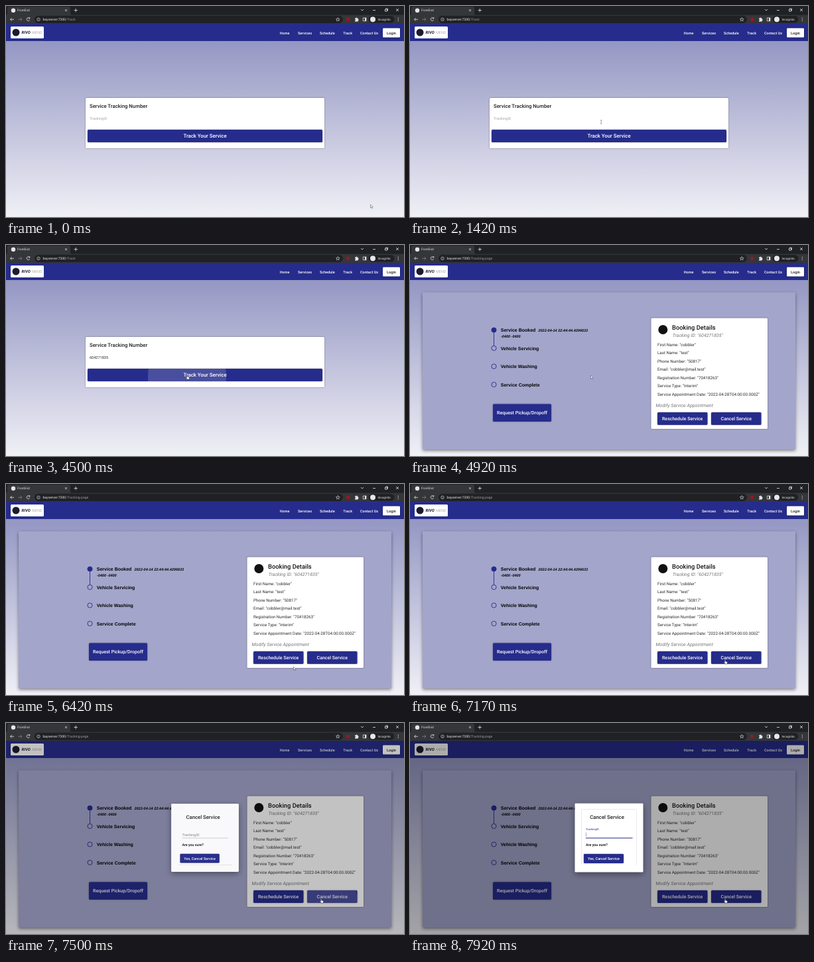
These frames come from a looping animation (600x319 px, 8000 ms). An HTML page:

```html
<!DOCTYPE html>
<html lang="en">
<head>
<meta charset="utf-8">
<title>Service tracking</title>
<style>
html, body { margin: 0; width: 100%; height: 100%; overflow: hidden; }
svg { display: block; width: 600px; height: 319px; font-family: Roboto, sans-serif; text-rendering: geometricPrecision; }
.m { font-weight: 500; }
.i { font-style: italic; }
.mid { text-anchor: middle; }
.w { fill: #fff; }
.grey { fill: #77777b; }
.blue { fill: #262c8c; }
.raised { filter: drop-shadow(0 .8px .8px #0006); }
.steps { font: bold 7px "Liberation Sans", Arial, sans-serif; }
.steps .date { font-size: 5.5px; font-style: italic; }
.line { fill: none; stroke: #e4e5e8; stroke-width: .8; }
#cursor path { stroke: #444; stroke-width: .5; fill: #fff; }
</style>
</head>
<body>
<svg viewBox="0 0 600 319">
  <defs>
    <linearGradient id="sky" x2="0" y2="1">
      <stop stop-color="#8b8ebe"/><stop offset="1" stop-color="#f0f0f6"/>
    </linearGradient>
    <clipPath id="trackClip"><rect x="123" y="187" width="354" height="19" rx="1.5"/></clipPath>
    <clipPath id="cancelClip"><rect x="454" y="253" width="75.5" height="19" rx="1.5"/></clipPath>
  </defs>

  <rect y="27" width="600" height="292" fill="url(#sky)"/>

  <!-- navigation bar -->
  <g>
    <rect y="27" width="600" height="26" class="blue"/>
    <rect x="7" y="31" width="50" height="18" rx="1.5" class="w"/>
    <circle cx="15" cy="40" r="5.5" fill="#1b1c30"/>
    <text x="23.5" y="42.2" font-size="6" class="i" font-weight="700" fill="#1b1c30">RIVO</text>
    <text x="39.3" y="42.2" font-size="5.5" class="i" font-weight="300" fill="#888">MEND</text>
    <g class="m w" font-size="5.5">
      <text x="412.7" y="42.5">Home</text><text x="440" y="42.5">Services</text>
      <text x="473" y="42.5">Schedule</text><text x="508.3" y="42.5">Track</text>
      <text x="534" y="42.5">Contact Us</text>
    </g>
    <rect x="568" y="33.5" width="26" height="14" rx="1.3" class="w raised"/>
    <text x="581" y="42.5" font-size="5.6" class="m mid" fill="#222">Login</text>
  </g>

  <g id="search">
    <rect x="120" y="139" width="360" height="76" rx="1.5" class="w raised"/>
    <text x="126" y="154.2" font-size="7.75" class="m" fill="#222">Service Tracking Number</text>
    <text id="field" x="126" y="171.5" font-size="5.55"></text>
    <rect id="caret" y="166.5" width=".4" height="6"/>
    <rect x="123" y="187" width="354" height="19" rx="1.5" class="blue raised"/>
    <g clip-path="url(#trackClip)"><circle id="trackRipple" cx="273" cy="198" class="w"/></g>
    <text x="300" y="199.1" font-size="7.8" class="m mid w">Track Your Service</text>
  </g>

  <g id="booking">
    <rect x="19" y="71.5" width="562" height="237.5" rx="1" fill="#a4a5cb" style="filter:drop-shadow(0 2px 2.5px #0007)"/>
    <g id="steps" class="steps">
      <path d="M126.5 128V152.5" stroke="#262c8c" stroke-width=".9"/>
      <text class="date" x="193.5" y="131">2022-04-14 22:44:44.4296633</text>
      <text class="date" x="137" y="139.5">-0400 -0400</text>
    </g>
    <rect x="125" y="240.5" width="88" height="26.5" rx="1.5" class="blue raised"/>
    <text x="169" y="256.3" font-size="7.05" class="m mid w">Request Pickup/Dropoff</text>

    <rect x="363.5" y="110.5" width="175.5" height="167.5" rx="1.5" class="w raised"/>
    <circle cx="381.3" cy="128" r="7" fill="#111"/>
    <text x="395" y="127.7" font-size="9.37" class="m" fill="#151515">Booking Details</text>
    <text x="395.8" y="139" font-size="7" class="i grey">Tracking ID: "604271835"</text>
    <g id="rows" font-size="6.23" fill="#2b2b2e"></g>
    <text x="370.5" y="245.3" font-size="7.08" class="i grey">Modify Service Appointment</text>
    <g class="blue raised">
      <rect x="373" y="253" width="75.5" height="19" rx="1.5"/>
      <rect x="454" y="253" width="75.5" height="19" rx="1.5"/>
    </g>
    <g clip-path="url(#cancelClip)"><circle id="cancelRipple" cx="475" cy="267" class="w"/></g>
    <g class="m mid w" font-size="7">
      <text x="410.7" y="265">Reschedule Service</text><text x="491.8" y="265">Cancel Service</text>
    </g>
  </g>

  <rect id="backdrop" y="27" width="600" height="292"/>

  <g id="dialog">
    <rect x="248.5" y="121.5" width="103" height="104" rx="1.3" class="w" style="filter:drop-shadow(0 3px 5px #0006)"/>
    <rect x="258.5" y="130.5" width="83" height="84.5" rx="1.2" class="w" style="filter:drop-shadow(0 .5px .7px #0005)"/>
    <text x="297" y="145" font-size="7.8" class="m mid" fill="#222">Cancel Service</text>
    <text id="label">TrackingID</text>
    <rect x="265" y="173.8" width="70.5" height=".4" fill="#888"/>
    <rect id="underline" y="173.5" height=".9" class="blue"/>
    <rect id="dialogCaret" x="265.2" y="165.5" width=".4" height="6.5" class="blue"/>
    <text x="265" y="186.4" font-size="5.4" class="m">Are you sure?</text>
    <rect x="262" y="198" width="60" height="14" rx="1.3" class="blue raised"/>
    <text x="292" y="207" font-size="5.5" class="m mid w">Yes, Cancel Service</text>
  </g>

  <!-- browser frame -->
  <g>
    <rect width="600" height="27" fill="#202124"/>
    <path d="M0 13.5q2 0 2-2V3q0-2 2-2H95q2 0 2 2v8.5q0 2 2 2H600V27H0Z" fill="#35363a"/>
    <circle cx="11" cy="6.7" r="3.2" fill="#e8e8ec"/>
    <text x="17" y="8.4" font-size="4.7" fill="#e4e5e8">FrontEnd</text>
    <path class="line" d="M89 5l3 3m0-3l-3 3M102.5 6.5h5.4m-2.7-2.7v5.4M535 5l2 2 2-2M553 6.5h4M571.5 5h3v3h-3zM572.5 5v-1h3v3h-1M588 4l4 4m0-4l-4 4"/>
    <rect x="43" y="14.7" width="465" height="11.2" rx="5.6" fill="#202124"/>
    <path class="line" d="M12 20.3H6.5m2.3-2.3l-2.3 2.3 2.3 2.3M35.5 18.5a2.4 2.4 0 1 0 .3 2.6M35.8 17v2h-2"/>
    <path class="line" style="stroke:#85868a" d="M18.5 20.3H24m-2.3-2.3l2.3 2.3-2.3 2.3"/>
    <g class="line" style="stroke-width:.6">
      <circle cx="49" cy="20.3" r="2.3"/>
      <path d="M49 20v1.5M49 18.8v.6M500.3 17.4l.8 2 2.1.1-1.7 1.3.6 2.1-1.8-1.2-1.8 1.2.6-2.1-1.7-1.3 2.1-.1z"/>
    </g>
    <text x="55.5" y="22.1" font-size="5.1" fill="#ececee">bayserver:7300<tspan id="path" fill="#9a9ca2"></tspan></text>
    <rect x="513.5" y="18" width="4.6" height="4.6" fill="#a3141c"/>
    <path fill="#e4e5e8" d="M526 18.5h1.4a1 1 0 0 1 2 0h1.3v1.6a1 1 0 0 1 0 2v1.3h-4.7v-1.4a1 1 0 0 0 0-2z"/>
    <path class="line" d="M538.3 18h4.6v4.7h-4.6z"/><path fill="#e4e5e8" d="M541 18h2v4.7h-2z"/>
    <rect x="546.5" y="15" width="39" height="10.6" rx="5.3" fill="#202124"/>
    <circle cx="553" cy="20.3" r="4" fill="#e8e8ec"/>
    <text x="560.5" y="22" font-size="4.6" fill="#ececee">Incognito</text>
    <path fill="#e4e5e8" d="M590.8 17.7h1v1h-1zm0 2.1h1v1h-1zm0 2.1h1v1h-1z"/>
  </g>

  <g id="cursor">
    <path id="arrow" d="M0 0V5.2L1.2 4.1 2 6 2.9 5.6 2.1 3.8H3.7Z"/>
    <path id="ibeam" style="fill:none" d="M-1.2-2.8Q0-2.8 0-2.2 0-2.8 1.2-2.8M0-2.2V2.2M-1.2 2.8Q0 2.8 0 2.2 0 2.8 1.2 2.8"/>
    <path id="hand" d="M0 .4Q.6-.4 1.1.4V2.3L3.6 2.9Q4 3 3.9 3.8L3.4 6H.8L-1 3.8Q-1 3-.3 3.2L0 3.5Z"/>
  </g>
</svg>
<script>
const LOOP = 8000;
const CODE = '604271835';
const FOCUS = 3420, PASTE = 3800, TRACK = 4480, PAGE = 4670;
const CANCEL = 7340, OPEN = 7390, OPENED = 7540;
// time, x, y
const ROUTE = [
  [500, 549.5, 300], [1250, 300, 181], [1600, 281, 172], [3850, 281, 172],
  [4170, 272.5, 197], [5000, 272.5, 197], [6200, 433.5, 276],
  [6450, 433.5, 276], [7000, 474.5, 266]
];

const $ = id => document.getElementById(id);
const set = (id, attrs) => { for (const k in attrs) $(id).setAttribute(k, attrs[k]); };
const show = (id, on) => $(id).style.display = on ? '' : 'none';
const mix = (a, b, p) => a + (b - a) * p;
const span = (t, start, length) => Math.max(0, Math.min(1, (t - start) / length));

function bezier(x1, y1, x2, y2) {
  const at = (a, b, s) => 3 * a * s * (1 - s) ** 2 + 3 * b * s * s * (1 - s) + s ** 3;
  return x => {
    let lo = 0, hi = 1;
    for (let n = 0; n < 20; n++) {
      const s = (lo + hi) / 2;
      if (at(x1, x2, s) < x) lo = s; else hi = s;
    }
    return at(y1, y2, hi);
  };
}
const easeOut = bezier(0, 0, .2, 1);
const swift = bezier(.25, .8, .25, 1);
const easeMove = bezier(.4, 0, .4, 1);

['Service Booked', 'Vehicle Servicing', 'Vehicle Washing', 'Service Complete'].forEach((name, n) => {
  const y = 128.5 + n * 27.5;
  $('steps').innerHTML += `<circle cx="126.5" cy="${y}" r="3.6" stroke="#262c8c" stroke-width=".9"
    fill="${n ? 'none' : '#262c8c'}"/><text x="136.8" y="${y + 2.5}">${name}</text>`;
});
[
  'First Name: "cobbler"', 'Last Name: "test"', 'Phone Number: "50817"',
  'Email: "cobbler@mail.test"', 'Registration Number: "70418263"',
  'Service Type: "Interim"', 'Service Appointment Date: "2022-04-28T04:00:00.000Z"'
].forEach((row, n) => $('rows').innerHTML += `<text x="373" y="${153 + n * 12.45}">${row}</text>`);

function pointer(t) {
  const next = ROUTE.findIndex(p => p[0] > t);
  if (next === 0) return ROUTE[0].slice(1);
  if (next < 0) return ROUTE[ROUTE.length - 1].slice(1);
  const [t0, x0, y0] = ROUTE[next - 1], [t1, x1, y1] = ROUTE[next];
  const p = easeMove((t - t0) / (t1 - t0));
  return [mix(x0, x1, p), mix(y0, y1, p)];
}

function ripple(id, t, start, radius) {
  set(id, {
    r: t < start ? 0 : radius * easeOut(span(t, start, 225)),
    opacity: .16 * (1 - span(t, start + 225, 150))
  });
}

function drawCursor(t) {
  const [x, y] = pointer(t);
  const inside = (l, top, r, b) => x > l && x < r && y > top && y < b;
  const kind = t < PAGE
    ? inside(123, 163, 477, 180) ? 'ibeam' : inside(123, 187, 477, 206) ? 'hand' : 'arrow'
    : inside(373, 253, 448.5, 272) || inside(454, 253, 529.5, 272) ? 'hand' : 'arrow';
  for (const id of ['arrow', 'ibeam', 'hand']) show(id, id === kind);
  set('cursor', { transform: `translate(${x} ${y})` });
}

function drawDialog(t) {
  const open = easeOut(span(t, OPEN, 150));
  const float = swift(span(t, OPENED, 400));
  const line = 70.5 * swift(span(t, OPENED, 300));
  set('backdrop', { opacity: .32 * swift(span(t, OPEN, 400)) });
  set('dialog', {
    opacity: open,
    transform: `translate(300 173.5) scale(${mix(.7, 1, open)}) translate(-300 -173.5)`
  });
  set('label', {
    x: 265, y: mix(170.5, 162, float), 'font-size': mix(5.6, 4.2, float),
    fill: t < OPENED ? '#858588' : '#262c8c'
  });
  set('underline', { x: 300.25 - line / 2, width: line });
  show('dialogCaret', t >= OPENED);
}

function draw(t) {
  const tracking = t >= PAGE, pasted = t >= PASTE;
  show('search', !tracking);
  show('booking', tracking);
  $('path').textContent = tracking ? '/Tracking-page' : '/Track';
  $('field').textContent = pasted ? CODE : 'TrackingID';
  set('field', { fill: pasted ? '#222' : '#a5a5a8' });
  set('caret', { x: pasted ? 154.4 : 126 });
  show('caret', t >= FOCUS && t < TRACK);
  ripple('trackRipple', t, TRACK, 205);
  ripple('cancelRipple', t, CANCEL, 57);
  drawDialog(t);
  drawCursor(t);
}

function tick() {
  draw(performance.now() % LOOP);
  requestAnimationFrame(tick);
}
tick();
</script>
</body>
</html>
```
